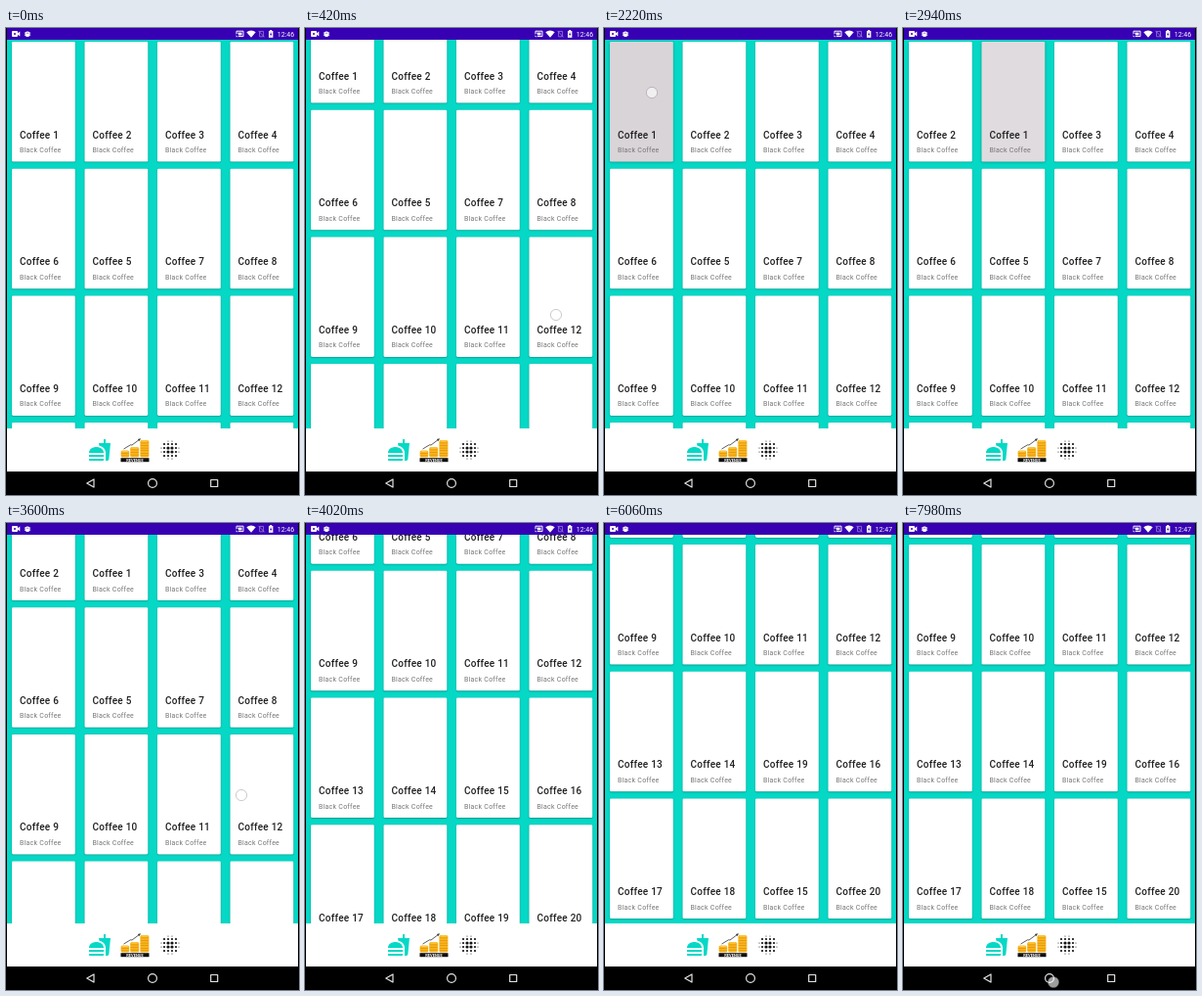
An HTML page with a canvas for the animation above (8 s loop, 300 by 477 pixels).

```html
<!DOCTYPE html>
<html lang="en">
<head>
<meta charset="utf-8">
<title>Coffee grid</title>
<style>
html, body { margin: 0; width: 100%; height: 100%; overflow: hidden; background: #000; }
canvas { display: block; width: 300px; height: 477px; }
</style>
</head>
<body>
<canvas id="stage"></canvas>
<script>
const W = 300, H = 477, LOOP = 8000, STEP = 60;
const TEAL = '#06d8c6', FONT = 'Roboto, "Open Sans", sans-serif';
const CARD = { w: 64.8, h: 122.5, dx: 74.5, dy: 129.7, x: 6, y: 14 };
const FOOD = new Path2D('M18.06 22.99h1.66c.84 0 1.53-.64 1.63-1.46L23 5.05h-5V1h-1.97v4.05h-4.97l.3 2.34c1.71.47 3.31 1.32 4.27 2.26 1.44 1.42 2.43 2.89 2.43 5.29v8.05zM1 21.99V21h15.03v.99c0 .55-.45 1-1.01 1H2.01c-.56 0-1.01-.45-1.01-1zm15.03-7c0-8-15.03-8-15.03 0h15.03zM1.02 17h15v2h-15z');

const canvas = document.getElementById('stage');
const ctx = canvas.getContext('2d');
const dpr = window.devicePixelRatio || 1;
canvas.width = W * dpr;
canvas.height = H * dpr;

const clamp = v => Math.max(0, Math.min(1, v));
const smooth = p => p * p * (3 - 2 * p);
const easeOut = p => 1 - (1 - p) ** 2.4;
const ramp = (t, a, b, ease = smooth) => ease(clamp((t - a) / (b - a)));

// Linear interpolation through [time, value] points.
function track(t, keys) {
  if (t <= keys[0][0]) return keys[0][1];
  for (let i = 1; i < keys.length; i++) {
    const [t0, v0] = keys[i - 1], [t1, v1] = keys[i];
    if (t < t1) return v0 + (v1 - v0) * (t - t0) / (t1 - t0);
  }
  return keys[keys.length - 1][1];
}

function rect(x, y, w, h, color) {
  ctx.fillStyle = color;
  ctx.fillRect(x, y, w, h);
}

function dot(x, y, r, color) {
  ctx.fillStyle = color;
  ctx.beginPath();
  ctx.arc(x, y, r, 0, Math.PI * 2);
  ctx.fill();
}

function poly(points, color) {
  ctx.fillStyle = color;
  ctx.beginPath();
  points.forEach(([x, y]) => ctx.lineTo(x, y));
  ctx.closePath();
  ctx.fill();
}

function text(str, x, y, font, color, spacing = 0, align = 'left') {
  ctx.font = font + ' ' + FONT;
  ctx.letterSpacing = spacing + 'px';
  ctx.textAlign = align;
  ctx.fillStyle = color;
  ctx.fillText(str, x, y);
}

function scrollAt(t) {
  if (t < 2000) return track(t, [[180, 0], [420, 60], [480, 60], [720, 11], [780, 0]]);
  if (t < 3720) return track(t, [[3360, 0], [3600, 57.5], [3720, 110]]);
  return 110 + 141.3 * ramp(t, 3720, 4320, easeOut);
}

// The two long-press drags: which card moves, and how far from its home slot.
function dragsAt(t) {
  const back = 1 - ramp(t, 5760, 5960);
  return [
    {
      id: 1, other: 2, on: t >= 1920 && t < 3180,
      x: CARD.dx * ramp(t, 2340, 2820), y: 0,
      swapX: -CARD.dx * ramp(t, 2580, 2820), swapY: 0,
      shade: ramp(t, 1920, 2200) * (1 - ramp(t, 2880, 3120))
    },
    {
      id: 15, other: 19, on: t >= 4680 && t < 6060,
      x: track(t, [[5160, 0], [5580, 2.5]]) * back,
      y: CARD.dy + (track(t, [[4920, 0], [5160, 64.8], [5400, 118], [5580, 125.5]]) - CARD.dy) * back,
      swapX: 0, swapY: -CARD.dy * ramp(t, 5320, 5570),
      shade: ramp(t, 4680, 4980) * (1 - ramp(t, 5760, 6040))
    }
  ];
}

function fingerAt(t) {
  if (t >= 120 && t < 1020)
    return [257, track(t, [[120, 360], [180, 353], [420, 293], [480, 293], [720, 342], [960, 370]])];
  if (t >= 1860 && t < 2880)
    return [49 + 78 * ramp(t, 2280, 2820), 66];
  if (t >= 3240 && t < 3720)
    return [241, track(t, [[3240, 346], [3360, 335.5], [3600, 278], [3720, 226]])];
  if (t >= 4380 && t < 5760)
    return [track(t, [[4900, 194], [5160, 197], [5580, 200]]),
      track(t, [[4860, 204.5], [5160, 282], [5400, 335], [5580, 342]])];
  if (t >= 7980) return [154, 469];
  return null;
}

function card(id, x, y, shade) {
  if (y > 410 || y + CARD.h < 10) return;
  ctx.save();
  ctx.shadowColor = 'rgba(0,40,40,.45)';
  ctx.shadowBlur = (shade ? 2.5 : 1.5) * dpr;
  ctx.shadowOffsetY = .6 * dpr;
  ctx.fillStyle = '#fff';
  ctx.beginPath();
  ctx.roundRect(x, y, CARD.w, CARD.h, 1.3);
  ctx.fill();
  ctx.restore();
  if (shade) {
    ctx.fillStyle = `rgba(40,14,34,${.175 * shade})`;
    ctx.fill();
  }
  text('Coffee ' + id, x + 8, y + 98.5, '500 10px', '#212121', .25);
  text('Black Coffee', x + 8, y + 113, '7px', '#757575', .25);
}

function grid(t) {
  const scroll = scrollAt(t), drags = dragsAt(t), held = [];
  ctx.save();
  ctx.beginPath();
  ctx.rect(1, 12, 298, 397);
  ctx.clip();
  rect(1, 12, 298, 397, TEAL);
  for (let slot = 0; slot < 20; slot++) {
    const id = slot === 4 ? 6 : slot === 5 ? 5 : slot + 1;
    const shown = slot === 4 || slot === 5 ? (slot === 4 ? 6 : 5) : id;
    let x = CARD.x + slot % 4 * CARD.dx;
    let y = CARD.y + Math.floor(slot / 4) * CARD.dy - scroll;
    let lifted = false, shade = 0;
    for (const d of drags) {
      if (d.id === id) {
        // Before its press a card stays home.
        const moved = d.on || t > 6000 || (d.id === 1 && t > 3000);
        if (moved) { x += d.x; y += d.y; }
        lifted = d.on;
        shade = d.on ? d.shade : 0;
      } else if (d.other === id) {
        x += d.swapX;
        y += d.swapY;
      }
    }
    if (lifted) held.push([shown, x, y, shade]);
    else card(shown, x, y, 0);
  }
  held.forEach(args => card(...args));
  ctx.restore();
}

function statusBar(t) {
  rect(1, 0, 298, 12, '#3700b3');
  ctx.fillStyle = '#fff';
  ctx.beginPath();
  ctx.roundRect(6, 3, 6, 6, 1);
  ctx.fill();
  poly([[11, 6], [14.3, 3.4], [14.3, 8.6]], '#fff');
  dot(9, 6, 1, '#3700b3');

  ctx.fillStyle = '#fff';
  ctx.beginPath();
  ctx.roundRect(19.6, 3.4, 4.8, 5.6, 2);
  ctx.fill();
  rect(18.8, 4.6, 6.4, .8, '#fff');
  rect(18.8, 6.8, 6.4, .8, '#fff');
  rect(20.8, 4.8, .8, .8, '#3700b3');
  rect(22.4, 4.8, .8, .8, '#3700b3');

  ctx.strokeStyle = '#fff';
  ctx.lineWidth = 1;
  ctx.strokeRect(236, 3.2, 7, 5.4);
  rect(237.5, 4.6, 4, 2.8, '#fff');
  rect(235.4, 6, 2.4, 3.2, '#3700b3');
  dot(236.2, 8.6, .7, '#fff');

  ctx.fillStyle = '#fff';
  ctx.beginPath();
  ctx.moveTo(251, 9.8);
  ctx.lineTo(246.3, 4.2);
  ctx.quadraticCurveTo(251, .8, 255.7, 4.2);
  ctx.fill();

  ctx.strokeStyle = '#9c82d8';
  ctx.lineWidth = .8;
  ctx.strokeRect(259.6, 3.4, 4, 5.4);
  ctx.beginPath();
  ctx.moveTo(258.5, 2.8);
  ctx.lineTo(264.6, 9.4);
  ctx.stroke();

  rect(269, 3, 4.4, 6.8, '#fff');
  rect(270.2, 2, 2, 1, '#fff');
  poly([[271.8, 4], [270, 6.8], [271.1, 6.8], [270.7, 8.8], [272.4, 5.9], [271.4, 5.9]], '#3700b3');
  text(t < 5880 ? '12:46' : '12:47', 295.2, 8.6, '7px', '#fff', 0, 'right');
}

function coins(x, y, w, bottom) {
  ctx.fillStyle = '#f9b51c';
  ctx.beginPath();
  ctx.roundRect(x, y, w, bottom - y, 1.6);
  ctx.fill();
  for (let k = y + 2.6; k < bottom - 1; k += 2.6) rect(x + .4, k, w - .8, .6, '#d98a0c');
  rect(x + 1.5, y + .6, w - 3, .8, '#ffd45a');
}

function bottomBar() {
  rect(1, 409, 298, 44, '#fff');
  ctx.save();
  ctx.translate(84, 419);
  ctx.fillStyle = TEAL;
  ctx.fill(FOOD);
  ctx.restore();

  coins(117.6, 431.5, 8.6, 438.5);
  coins(127.2, 428, 9, 438.5);
  coins(137.4, 421, 9, 438.5);
  ctx.strokeStyle = '#333';
  ctx.lineWidth = .8;
  ctx.beginPath();
  ctx.moveTo(120.5, 430);
  ctx.lineTo(127.5, 425.8);
  ctx.lineTo(129, 426);
  ctx.lineTo(136.5, 420.4);
  ctx.stroke();
  poly([[138, 419.2], [134.8, 420], [136.6, 422]], '#333');
  rect(117.5, 439.2, 29, 4, '#111');
  text('REVENUE', 132, 442.7, 'bold 4px', '#fff', 0, 'center');

  for (let r = 0; r < 4; r++) for (let c = 0; c < 4; c++) {
    const core = r % 3 && c % 3;
    dot(162 + c * 4, 425 + r * 4, core ? 1.6 : 1.1, '#111');
  }
  for (const far of [-9, 9]) for (const off of [-2, 2]) {
    dot(168 + far, 431 + off, .6, '#333');
    dot(168 + off, 431 + far, .6, '#333');
  }
}

function navBar() {
  ctx.strokeStyle = '#e4e4e4';
  ctx.lineWidth = 1.2;
  ctx.lineJoin = 'round';
  ctx.beginPath();
  ctx.moveTo(82.8, 465);
  ctx.lineTo(90, 460.9);
  ctx.lineTo(90, 469.1);
  ctx.closePath();
  ctx.stroke();
  ctx.beginPath();
  ctx.arc(150, 465, 4.4, 0, Math.PI * 2);
  ctx.stroke();
  ctx.strokeRect(209.7, 461.5, 7, 7);
}

function finger(t) {
  const p = fingerAt(t);
  if (!p) return;
  dot(p[0], p[1], 5.6, 'rgba(255,255,255,.62)');
  ctx.strokeStyle = 'rgba(110,110,125,.4)';
  ctx.lineWidth = .9;
  ctx.stroke();
}

function draw(t) {
  ctx.setTransform(dpr, 0, 0, dpr, 0, 0);
  rect(0, 0, W, H, '#000');
  grid(t);
  statusBar(t);
  bottomBar();
  navBar();
  finger(t);
}

const start = performance.now();
function tick() {
  const t = (performance.now() - start) % LOOP;
  draw(Math.floor(t / STEP) * STEP);
  requestAnimationFrame(tick);
}
tick();
</script>
</body>
</html>
```
